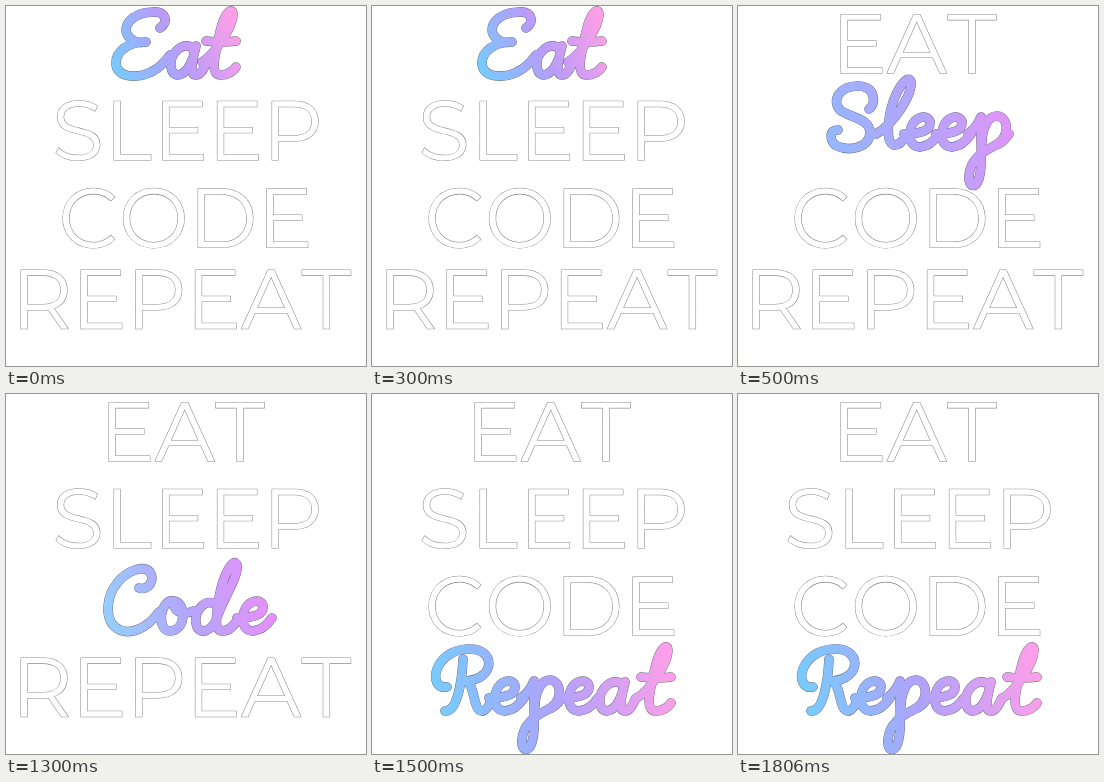
An HTML page with a canvas for the animation above (2.01 s loop, 360x360 px).

```html
<!DOCTYPE html>
<html lang="en">
<meta charset="utf-8">
<title>Eat Sleep Code Repeat</title>
<style>
  html, body { margin: 0; height: 100%; overflow: hidden; background: #fff; }
  canvas { display: block; }
</style>
<canvas id="stage" width="360" height="360" role="img" aria-label="Eat Sleep Code Repeat"></canvas>
<script>
const ctx = document.getElementById('stage').getContext('2d');
const LOOP = 2010, STEP = 500, CAP_SCALE = 0.0838;

// Capitals: [advance, outline], 1000 units per em, y down from cap height.
const bowl = 'M189 64V411H375C515 411 590 349 590 238S515 64 375 64Z';
const caps = {
  E: [653, 'M115 0H586V64H189V313H532V376H189V636H602V700H115Z'],
  L: [580, 'M115 0H189V636H553V700H115Z'],
  T: [588, 'M4 0H584V64H331V700H257V64H4Z'],
  A: [731, 'M329 0H402L721 700H643L558 513H172L88 700H11ZM365 80L199 453H531Z'],
  P: [712, 'M115 0H377C556 0 664 90 664 238S556 476 377 476H189V700H115Z' + bowl],
  R: [716, 'M115 0H377C556 0 664 90 664 238C664 346 607 424 507 457L678 700H597L441 473Q419 476 377 476H189V700H115Z' + bowl],
  S: [614, 'M38 613L67 556C117 606 206 644 298 644C429 644 486 589 486 520C486 328 53 446 53 186C53 83 133 -6 311 -6C390 -6 472 17 528 56L503 115C443 76 373 58 311 58C183 58 126 115 126 186C126 378 559 262 559 518C559 621 476 706 297 706C192 706 89 668 38 613Z'],
  C: [721, 'M668 604C605 671 514 706 413 706C205 706 51 555 51 350S205 -6 414 -6C515 -6 606 28 668 96L621 143C564 85 495 60 416 60C249 60 125 183 125 350S249 640 416 640C495 640 564 613 621 556Z'],
  O: [828, 'M51 350C51 146 205 -6 414 -6S777 146 777 350S623 706 414 706S51 554 51 350ZM125 350C125 518 248 640 414 640S703 518 703 350S580 60 414 60S125 182 125 350Z'],
  D: [821, 'M115 0H400C620 0 769 143 769 350S620 700 400 700H115ZM189 64V636H396C580 636 696 518 696 350S580 64 396 64Z']
};

// Brush letters: centre lines in pixels, baseline at y = 0.
const script = {
  E: 'M48 -52C57 -58 54 -69 40 -68C18 -67 9 -52 17 -43C21 -38 28 -37 34 -38C15 -38 4 -28 4 -17C4 -1 27 -2 39 -8C48 -12 53 -18 58 -25',
  S: 'M43 -43C51 -49 49 -66 32 -66C14 -66 5 -52 14 -42C24 -34 44 -34 44 -19C43 -3 22 -1 11 -6C3 -10 3 -23 12 -22',
  C: 'M35 -48C45 -45 51 -56 46 -64C39 -72 22 -64 14 -54C2 -40 1 -19 10 -10C23 2 43 -7 55 -24',
  R: 'M32 -57C31 -34 26 -4 14 -5M16 -29C-4 -26 2 -66 37 -67C65 -68 65 -37 35 -35C44 -32 42 -5 51 -5C55 -5 59 -12 62 -18',
  e: 'M0 -18C12 -18 26 -20 26 -29C26 -39 6 -37 6 -17C6 0 24 -2 35 -18',
  a: 'M28 -30C20 -41 3 -28 5 -13C7 0 20 -3 27 -22L30 -34C25 -15 24 -5 30 -5C35 -5 38 -12 41 -18',
  t: 'M0 -18C14 -27 30 -52 31 -65C31 -73 23 -70 18 -48C12 -22 8 -5 19 -5C26 -5 31 -9 34 -13M4 -39Q20 -37 34 -39',
  l: 'M0 -18C18 -28 36 -57 35 -70C33 -80 17 -62 13 -32C9 0 22 -3 32 -18',
  p: 'M0 -18C6 -22 10 -28 13 -35C12 -15 15 6 12 22C9 38 0 36 1 24C2 8 14 0 26 -6C43 -14 41 -35 29 -36C19 -36 14 -22 14 -10M26 -6C33 -8 37 -13 41 -18',
  o: 'M18 -35C4 -38 0 -5 14 -5C30 -5 31 -33 18 -35C16 -25 26 -20 37 -25',
  d: 'M24 -30C15 -40 1 -27 3 -13C5 1 20 -4 25 -21C30 -37 46 -60 44 -71C41 -80 30 -62 26 -38C22 -14 22 -5 30 -5C37 -5 42 -12 46 -18'
};

// x: ink origin; top: cap line; base and at: script baseline and letter places;
// ramp: gradient line and colours.
const words = [
  { text: 'Eat', x: 93.4, top: 8.5, base: 74, at: [106, 160, 196],
    ramp: [106, 66, 228, 8, '#74ccff', '#b89cfa', '#ff9fe6'] },
  { text: 'Sleep', x: 47, top: 95.3, base: 146, at: [88, 138, 166, 198, 230],
    ramp: [90, 140, 268, 90, '#94b8ff', '#b3a4fb', '#e095f9'] },
  { text: 'Code', x: 52.7, top: 182.8, base: 242, at: [98, 150, 187, 231],
    ramp: [98, 228, 258, 180, '#94d0ff', '#b5a5fb', '#e890fa'] },
  { text: 'Repeat', x: 5.4, top: 264, base: 322, at: [59, 117, 149, 191, 223, 265],
    ramp: [59, 322, 300, 262, '#72cfff', '#b0a2fb', '#ff9fe8'] }
];

function capsPath({ text, x, top }) {
  const path = new Path2D();
  for (const letter of text.toUpperCase()) {
    const [advance, outline] = caps[letter];
    path.addPath(new Path2D(outline), new DOMMatrix([CAP_SCALE, 0, 0, CAP_SCALE, x, top]));
    x += advance * CAP_SCALE;
  }
  return path;
}

function scriptPath({ text, at, base }) {
  const path = new Path2D();
  [...text].forEach((letter, i) =>
    path.addPath(new Path2D(script[letter]), new DOMMatrix([1, 0, 0, 1, at[i], base])));
  return path;
}

function gradient([x0, y0, x1, y1, ...colours]) {
  const ramp = ctx.createLinearGradient(x0, y0, x1, y1);
  colours.forEach((colour, i) => ramp.addColorStop(i / (colours.length - 1), colour));
  return ramp;
}

for (const word of words) {
  word.plain = capsPath(word);
  word.brush = scriptPath(word);
  word.paint = gradient(word.ramp);
}

function stroke(path, style, width) {
  ctx.strokeStyle = style;
  ctx.lineWidth = width;
  ctx.stroke(path);
}

function draw(now) {
  const active = Math.min(3, Math.floor(now % LOOP / STEP));
  ctx.fillStyle = '#fff';
  ctx.fillRect(0, 0, 360, 360);
  ctx.lineCap = ctx.lineJoin = 'round';
  words.forEach((word, i) => {
    if (i === active) {
      stroke(word.brush, '#667', 9.6);
      stroke(word.brush, word.paint, 8.8);
    } else {
      stroke(word.plain, '#8a8a92', 1.1);
      ctx.fill(word.plain, 'evenodd');
    }
  });
}

const start = performance.now();
function tick() {
  draw(performance.now() - start);
  requestAnimationFrame(tick);
}
tick();
</script>
</html>
```
